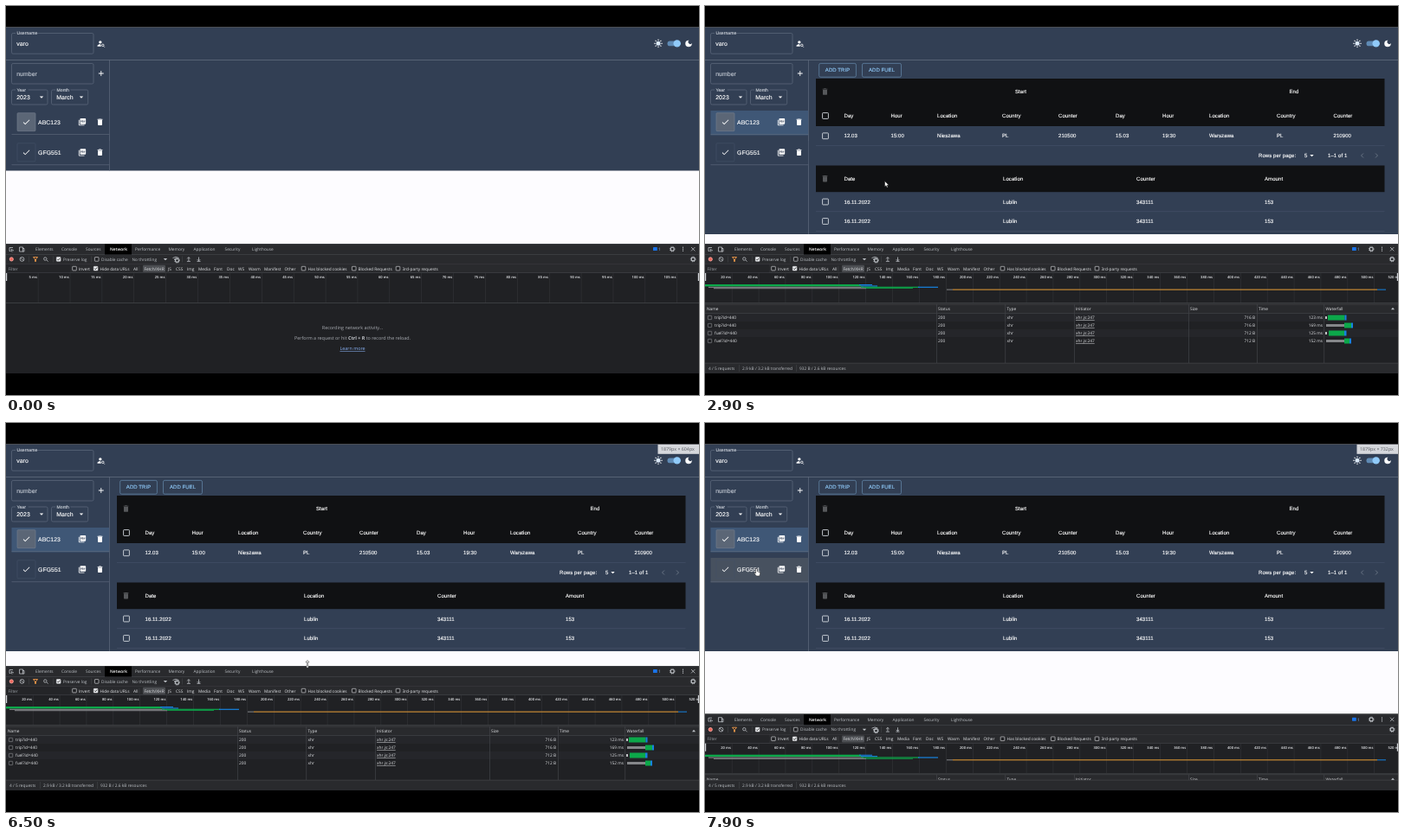
An HTML page that plays this animation: 800x450 px, repeating every 8 s.

```html
<!DOCTYPE html>
<html lang="en">
<head>
<meta charset="utf-8">
<title>Trip log with network panel</title>
<style>
  html, body { margin: 0; width: 100%; height: 100%; overflow: hidden; background: #000; }
  svg { display: block; width: 800px; height: 450px; }
  text { text-rendering: geometricPrecision; white-space: pre; }
  .app text { font-family: "Liberation Sans", Arial, sans-serif; letter-spacing: .01em; stroke-width: .14px; }
  .dev text { font-family: "Open Sans", "Noto Sans", sans-serif; }
</style>
</head>
<body>
<svg id="stage" viewBox="0 0 800 450"></svg>
<script>
const LOOP = 8000;
const $ = id => document.getElementById(id);

// ---- drawing helpers (y of text is its middle) ----
const text = (x, y, s, size, fill = '#fff', extra = '') =>
  `<text x="${x}" y="${y + size * .36}" font-size="${size}" fill="${fill}" ${extra}>${s}</text>`;
const rect = (x, y, w, h, fill, extra = '') =>
  `<rect x="${x}" y="${y}" width="${w}" height="${h}" fill="${fill}" ${extra}/>`;
const frame = (x, y, w, h, stroke, r = 1.6, sw = .7) =>
  rect(x, y, w, h, 'none', `rx="${r}" stroke="${stroke}" stroke-width="${sw}"`);
const path = (d, fill, stroke = 'none', sw = .8, extra = '') =>
  `<path d="${d}" fill="${fill}" stroke="${stroke}" stroke-width="${sw}" ${extra}/>`;
const icon = (x, y, size, body) =>
  `<g transform="translate(${x - size / 2} ${y - size / 2}) scale(${size / 24})">${body}</g>`;
const group = (id, body, extra = '') => `<g id="${id}" ${extra}>${body}</g>`;
const END = 'text-anchor="end"', MID = 'text-anchor="middle"', BOLD = 'font-weight="600"';

// ---- app ----
const NAVY = '#323f54', LINE = '#5f6b7e', WHITE = '#fff';
const app = (x, y, s, size = 6.05, fill = WHITE, extra = '') =>
  text(x, y, s, size, fill, `stroke="${fill}" ${extra}`);
const trash = (x, y, fill = WHITE) => icon(x, y, 10,
  path('M6 19a2 2 0 0 0 2 2h8a2 2 0 0 0 2-2V7H6zM19 4h-3.5l-1-1h-5l-1 1H5v2h14z', fill));
const pages = (x, y) => icon(x, y, 10,
  path('M8 2h12a2 2 0 0 1 2 2v12a2 2 0 0 1-2 2H8a2 2 0 0 1-2-2V4a2 2 0 0 1 2-2zM4 6H2v14a2 2 0 0 0 2 2h14v-2H4z', WHITE) +
  path('M9 8v5M9 8.5h2v2H9M13 8v4.5h2v-4zM18 13V8.5h2M18 10.5h2', 'none', NAVY, 1.2));
const caret = (x, y, fill = WHITE) => path(`M${x - 2.2} ${y - 1}h4.4l-2.2 2.3z`, fill);
const box = (x, y) => frame(x - 3.4, y - 3.4, 6.8, 6.8, '#d3d8df', .7, .9);

function field(x, y, w, h, label, value) {
  const gap = label ? rect(x + 4.5, y - 1, label.length * 2.65 + 4, 2, NAVY) + app(x + 6, y - .1, label, 5.1, '#ccd2da') : '';
  return frame(x, y, w, h, LINE) + gap +
    app(x + 5.7, y + h / 2 + (h < 20 ? .3 : 0), value, 6.9, label ? WHITE : '#c0c7d1');
}

function vehicle(y, name, active) {
  return rect(13, y - 10.5, 21, 21, active ? '#5b6676' : 'none', `rx="1" stroke="${active ? '#778191' : '#465268'}" stroke-width=".6"`) +
    icon(23.5, y, 10.5, path('M9 16.2 4.8 12l-1.4 1.4L9 19 21 7l-1.4-1.4z', WHITE)) +
    app(37, y, name, 6.85) + pages(88, y) + trash(108.5, y) +
    rect(6.5, y + 14.2, 113, .6, LINE);
}

function sun(x, y) {
  let rays = '';
  for (let a = 0; a < 360; a += 45) rays += `<path d="M${x} ${y - 3.3}v-1.5" stroke="#fff" stroke-width="1" transform="rotate(${a} ${x} ${y})"/>`;
  return `<circle cx="${x}" cy="${y}" r="2.5" fill="#dceafa"/>` + rays;
}

const shell =
  rect(0, 62, 800, .8, LINE) +
  field(6.5, 31.5, 94.5, 23.7, 'Username', 'varo') +
  field(6.5, 66.5, 94.5, 23.5, '', 'number') +
  field(6.5, 97, 41.5, 17, 'Year', '2023') + caret(41, 105.5) +
  field(52.5, 97, 42.2, 17, 'Month', 'March') + caret(87, 105.5) +
  icon(109.7, 43.5, 10, `<circle cx="10" cy="8" r="4" fill="#fff"/>` +
    path('M2 20v-2c0-2.600 4.500-4 8-4 1.200 0 1 3 2.500 6z', WHITE) +
    path('M19.300 19.300 22 22M20 16.500a3 3 0 1 1-6 0a3 3 0 1 1 6 0', 'none', WHITE, 2)) +
  icon(109.8, 78, 10, path('M19 13h-6v6h-2v-6H5v-2h6V5h2v6h6z', WHITE)) +
  sun(753, 43.3) + rect(763.5, 40.5, 15, 5.8, '#5f8ab4', 'rx="2.9"') +
  '<circle cx="774.700" cy="43.400" r="4.200" fill="#90caf9"/>' +
  icon(788, 43.5, 10, path('M12 3a9 9 0 1 0 9 9c0-.5 0-.9-.1-1.4A5.4 5.4 0 1 1 13.4 3.1 9 9 0 0 0 12 3z', WHITE));

const button = (x, w, s) => frame(x, 66.4, w, 15.8, '#668cae', 1.7) +
  app(x + w / 2, 74.2, s, 6, '#90caf9', `${MID} letter-spacing=".17"`);
const TRIP_X = [160.5, 214.5, 268, 343, 408, 474, 528, 582, 660, 725.5];
const FUEL_X = [160.5, 344, 498, 646];
const cells = (xs, y, words) => words.map((w, i) => app(xs[i], y, w)).join('');
const leg = ['Day', 'Hour', 'Location', 'Country', 'Counter'];
const fuelHead = ['Date', 'Location', 'Counter', 'Amount'];
const fuelRow = y => box(139, y) + cells(FUEL_X, y, ['16.11.2022', 'Lublin', '343111', '153']) +
  rect(128, y + 11, 656.5, .6, '#46536a');

const tables =
  button(131.7, 42.7, 'ADD TRIP') + button(181.5, 45, 'ADD FUEL') +
  rect(128, 84, 656.5, 55, '#101113') + trash(138.5, 99, '#56585b') + box(139, 127) +
  box(139, 150.3) + cells(TRIP_X, 150.3, ['12.03', '15:00', 'Nieszawa', 'PL', '210500', '15.03', '19:30', 'Warszawa', 'PL', '210900']) +
  rect(128, 161.3, 656.5, .6, '#46536a') +
  app(639, 172.9, 'Rows per page:') + app(692, 172.9, '5') + caret(700.5, 173) + app(719, 172.9, '1–1 of 1') +
  path('M760 170.500l-2.500 2.500 2.500 2.500M774 170.500l2.500 2.500-2.500 2.500', 'none', '#6d7888', .9) +
  rect(128, 184.5, 656.5, 30.7, '#101113') + trash(138.5, 199.7, '#56585b');

const heads =
  app(364.5, 99, 'Start', 6.05, WHITE, MID) + app(680, 99, 'End', 6.05, WHITE, MID) +
  cells(TRIP_X, 127, [...leg, ...leg]) +
  group('fuelWait', [247, 361.5, 513, 658.5].map((x, i) => app(x, 199.7, fuelHead[i], 6.05, WHITE, MID)).join('')) +
  group('fuelHead', cells(FUEL_X, 199.7, fuelHead));

// ---- network panel ----
const PANEL = '#202124', BAR = '#292a2d', EDGE = '#47494d', GREY = '#bdc1c6';
const dev = (x, y, s, fill = '#d0d3d8', extra = '', size = 4.8) => text(x, y, s, size, fill, extra);
const words = (y, list, fill) => list.map(([x, s]) => dev(x, y, s, fill)).join('');
const tick = (x, y, on) => rect(x - 2.3, y - 2.3, 4.6, 4.6, on ? '#e8eaed' : '#202124', 'rx=".5" stroke="#e8eaed" stroke-width=".6"') +
  (on ? path(`M${x - 1.4} ${y}l1.1 1.200 1.900-2.400`, 'none', '#222', .8) : '');
const gear = (x, y) => `<circle cx="${x}" cy="${y}" r="2" fill="none" stroke="${GREY}" stroke-width="1.100"/>` +
  `<circle cx="${x}" cy="${y}" r="2.900" fill="none" stroke="${GREY}" stroke-width=".8" stroke-dasharray="1.140 1.140"/>`;
const line = (d, color = GREY, sw = .8) => path(d, 'none', color, sw);

const toolbars =
  rect(0, 275, 800, 70, PANEL) + rect(0, 275, 800, 33.5, BAR) +
  rect(0, 275, 800, .6, EDGE) + rect(0, 287.3, 800, .6, EDGE) + rect(0, 298.4, 800, .5, '#3c3d41') + rect(0, 308.4, 800, .6, EDGE) +
  line('M8 279.500h-4v4h1.500M6 281.500l3 1.500M6 281.500l1 3M15.500 279h4v5h-4zM19 280.500h2v3.500h-2') +
  rect(114, 275.5, 31, 12, '#000') + dev(120, 281.4, 'Network', WHITE, BOLD) +
  words(281.4, [[34, 'Elements'], [64, 'Console'], [92, 'Sources'], [149, 'Performance'], [187.5, 'Memory'], [216.5, 'Application'], [252.5, 'Security'], [284, 'Lighthouse']], GREY) +
  rect(747, 279, 4.8, 4, '#1a73e8', 'rx=".6"') + dev(753, 281.2, '1', '#8ab4f8') + gear(769.2, 281.2) +
  [-2, 0, 2].map(d => `<circle cx="781.500" cy="${281.2 + d}" r=".65" fill="${GREY}"/>`).join('') +
  line('M791 279l4.400 4.400M795.400 279l-4.400 4.400') +
  '<circle cx="6.300" cy="292.900" r="2.100" fill="#ee675c" stroke="#f5a49d" stroke-width=".9"/>' +
  '<circle cx="18.500" cy="292.900" r="2.400" fill="none" stroke="#bdc1c6" stroke-width=".8"/>' +
  line('M16.900 291.200l3.300 3.300M45.500 292.500m-1.900 0a1.700 1.700 0 1 0 3.400 0a1.700 1.700 0 1 0-3.400 0M46.800 293.800l1.800 1.800') +
  path('M31.500 290.500h5l-2 2.500v2.500h-1V293z', 'none', '#f29a4a', .9) +
  rect(26.5, 289.5, .5, 7, EDGE) + rect(54, 289.5, .5, 7, EDGE) + rect(98.3, 289.5, .5, 7, EDGE) + rect(203.5, 289.5, .5, 7, EDGE) +
  tick(60.7, 292.9, true) + tick(104.7, 292.9) +
  words(293, [[66, 'Preserve log'], [110, 'Disable cache'], [145.5, 'No throttling']], GREY) + caret(184, 293, GREY) +
  line('M192.500 291.500q3.500-2.500 7 0M194 293.200q2-1.500 4 0') + gear(197.5, 294.2) +
  line('M210.900 295v-4.200M209.200 292.300l1.700-1.700 1.700 1.700M208.900 295.400h4M222.500 290.500v4.200M220.800 293.200l1.700 1.700 1.700-1.700M220.500 295.400h4') +
  gear(793.2, 292.9) +
  rect(0, 299.2, 74, 9, '#242528') + dev(2.5, 303.8, 'Filter', '#9aa0a6') +
  rect(158, 299.8, 26, 8, '#4d4f53', 'rx="1"') +
  tick(79, 303.6) + tick(103.6, 303.6, true) + tick(343.5, 303.6) + tick(401.7, 303.6) + tick(452.5, 303.6) +
  words(303.8, [[84, 'Invert'], [108.5, 'Hide data URLs'], [147, 'All'], [159.5, 'Fetch/XHR'], [187, 'JS'], [196, 'CSS'], [209, 'Img'], [222, 'Media'], [240, 'Font'], [255, 'Doc'], [268, 'WS'], [280, 'Wasm'], [298, 'Manifest'], [321.5, 'Other'], [348.5, 'Has blocked cookies'], [406.5, 'Blocked Requests'], [457.5, '3rd-party requests']], '#e3e5e8') +
  rect(153.7, 300.5, .5, 6.5, EDGE);

function axis(step, ms) {
  let out = '';
  for (let i = 1; i * step < 805; i++) {
    out += rect(i * step, 309, .5, 34.5, '#37393d') +
      dev(Math.min(i * step - 1, 803), 313.8, `${i * ms} ms`, '#e8eaed', `${END} ${BOLD}`, 4.1);
  }
  return out + rect(0, 309, 1.2, 9, '#d0d3d8') + rect(798.8, 309, 1.2, 9, '#d0d3d8') + rect(0, 343.3, 800, .7, EDGE);
}

const GREEN = '#0ca84a', BLUE = '#1683e0', STALL = '#85878a', ORANGE = '#c88a34';
const bars = list => list.map(([x, end, y, h, c]) => rect(x, y, end - x, h, c)).join('');
const earlyBars = bars([[0, 350, 322, 1, STALL], [10, 350, 323, 2.2, GREEN], [350, 377, 321.8, 1, BLUE], [350, 392, 323.4, 1.6, BLUE],
  [8, 352, 325.4, 1, STALL], [340, 473, 325.4, 1.1, GREEN], [473, 526, 324.6, 1, BLUE], [385, 470, 326.8, .8, GREEN], [470, 481, 326.7, 1, BLUE]]);
const lateBars = bars([[0, 180, 322, 2.4, GREEN], [178, 193, 322, 1, BLUE], [180, 199, 323.4, 1.2, BLUE], [4, 183, 324.8, 1.1, STALL],
  [180, 247, 324.7, 1.2, GREEN], [246, 269, 324.7, 1.2, BLUE], [10, 186, 326.2, 1, STALL], [186, 240, 326.2, .8, GREEN],
  [279, 286, 327.6, 1, STALL], [286, 776, 327.5, 1.2, ORANGE], [776, 786, 327.6, 1, BLUE]]);

const COLS = [267, 346.5, 426, 558, 637, 714.5];
const rules = (y, h) => COLS.map(x => rect(x, y, .6, h, EDGE)).join('');
const requests = [['trip', 716, 123], ['trip', 716, 169], ['fuel', 712, 125], ['fuel', 712, 152]];
const rowY = i => 360.5 + 9 * i;
const rowList = requests.map(([name, size, time], i) => {
  const y = rowY(i);
  return rect(0, y - 4.5, 800, 9, i % 2 ? '#202124' : '#25262a') + frame(3.4, y - 2.2, 4.3, 4.3, '#8b8e93', .4, .6) +
    words(y, [[11, `${name}?id=440`], [269, '200'], [348.5, 'xhr']], '#e3e5e8') +
    dev(428, y, 'xhr.js:247', '#e3e5e8', 'text-decoration="underline"') +
    dev(635, y, `${size} B`, '#e3e5e8', END) + dev(713, y, `${time} ms`, '#e3e5e8', END);
}).join('');
// each entry: start, green start, blue start, end
const waterfall = list => list.map(([a, g, b, e], i) => {
  const y = rowY(i);
  return (g - a > 8 ? rect(a, y - 1.5, g - a, 3, STALL) : rect(a, y - 1.5, 1.6, 3, '#e8eaed')) +
    rect(g, y - 3, b - g, 6, GREEN) + rect(b, y - 3, e - b, 6, BLUE);
}).join('');

const tableHead = rect(0, 344, 800, 11.5, BAR) + rect(0, 344.8, 800, .6, EDGE) + rect(0, 355, 800, .6, EDGE) + rules(345, 10) +
  words(350.3, [[2, 'Name'], [269, 'Status'], [348.5, 'Type'], [428, 'Initiator'], [560, 'Size'], [639, 'Time'], [716.5, 'Waterfall']], '#e3e5e8') +
  path('M792 351.300h4l-2-2.600z', GREY);
const status = rect(0, 413, 800, 12, BAR) + rect(0, 412.8, 800, .6, EDGE) + dev(4, 419.2, '4 / 5 requests', GREY) +
  rect(39, 415, .5, 8, EDGE) + rect(105, 415, .5, 8, EDGE);
const totals = (sent, size) => dev(43, 419.2, `2.9 kB / ${sent} transferred`, GREY) + dev(109, 419.2, `932 B / ${size} resources`, GREY);
const empty = dev(400, 372.3, 'Recording network activity...', '#a9adb3', MID, 5.4) +
  dev(400, 384.2, 'Perform a request or hit <tspan font-weight="700" fill="#c9ccd1">Ctrl + R</tspan> to record the reload.', '#a9adb3', MID, 5.4) +
  dev(400, 396.2, 'Learn more', '#8ab4f8', `${MID} text-decoration="underline"`, 5.4);

// ---- pointer shapes, hot spot at 0,0 ----
const pointers =
  group('ripple', '<circle r="6.800" fill="#aab2bd" opacity=".35"/>') +
  group('arrow', path('M0 0v6.500l1.500-1.300 1.100 2.400 1.100-.5-1.100-2.300h2.100z', WHITE, '#111', .5)) +
  group('hand', path('M-.9 .8a.9 .9 0 0 1 1.800 0v2.500l2.400.6q1 .3.9 1.300l-.4 2q-.2 1.200-1.200 1.200h-2.200q-.8 0-1.200-.7l-1.900-2.600q.6-.9 1.800.2z', WHITE, '#111', .45)) +
  group('resize', path('M0-4.600l2 2.300H.6v4.600H2l-2 2.300-2-2.300h1.400v-4.600H-2z', WHITE, '#111', .45));

$('stage').innerHTML =
  rect(0, 24, 800, 402, '#fdfcff') +
  group('page', rect(0, 24.5, 800, 166, NAVY, 'id="sheet"') + rect(119.2, 62, .7, 128, LINE, 'id="divider"') +
    rect(6.5, 121, 112.7, 28.5, NAVY, 'id="row1"') + rect(6.5, 156, 112.7, 28.5, NAVY, 'id="row2"') +
    shell + vehicle(134.2, 'ABC123', true) + vehicle(169.3, 'GFG551', false) +
    group('tables', tables) + group('fuelRows', fuelRow(226.5) + fuelRow(249)) +
    rect(0, 24.5, 800, 251, '#000', 'id="shade"') + group('heads', heads), 'class="app"') +
  group('tip', rect(752.5, 24.5, 47.5, 11.3, '#d5d7dc') + dev(756, 30.4, '', '#55585e', 'id="tipText"', 5.3), 'class="dev"') +
  group('panel',
    rect(0, 275, 800, 150, PANEL, 'id="panelBg"') +
    group('rows', rowList + rules(355, 58) +
      group('fallEarly', waterfall([[716.8, 720, 772, 777], [719, 773, 797, 799], [716.8, 722, 772, 779], [719, 773, 788, 793]])) +
      group('fallLate', waterfall([[716.2, 719, 738.5, 740.5], [717, 738, 746, 748], [716.2, 720, 738, 740.5], [717, 738, 744, 746]]))) +
    group('scroll', rect(793, 388, 7, 25, '#3a3b3e') + rect(794, 399, 5, 9, '#77797d') +
      path('M794.500 394h4l-2-2.500zM794.500 409h4l-2 2.500z', GREY)) +
    group('chrome', toolbars + group('axis0', axis(36.88, 5)) + group('axis1', axis(37.85, 10) + earlyBars) +
      group('axis2', axis(30.9, 20) + lateBars) + group('head', tableHead)) +
    group('empty', empty) +
    group('status', status + group('sum1', totals('2.9 kB', '932 B')) + group('sum2', totals('3.2 kB', '2.6 kB'))), 'class="dev"') +
  rect(0, 0, 800, 24.5, '#000') + rect(0, 425, 800, 25, '#000') +
  group('tipTop', '') + group('pointer', pointers);

// ---- motion ----
const moves = [[1400, 250, 268], [1900, 58, 129], [2000, 57.5, 128], [2100, 60, 136], [2300, 95.5, 222.5], [2500, 148, 228],
  [2900, 207.5, 202.5], [4700, 207.5, 202.5], [5000, 120, 190], [5300, 38.5, 170], [5500, 38.5, 170], [5900, 170, 218],
  [6400, 348, 276], [6500, 348, 279], [6800, 348, 323], [7000, 348, 334], [7300, 348, 338], [7600, 210, 262], [7900, 59.5, 168.5]];
const drag = [[6400, 0], [6600, 12], [6800, 33.5], [7000, 49], [7300, 61.7]];
const dim = [[2100, 0], [2200, .4], [2300, .35], [2500, .12], [2600, 0]];

function at(track, t) {
  const i = track.findIndex(k => k[0] > t);
  if (i < 0) return track[track.length - 1].slice(1);
  if (i === 0) return track[0].slice(1);
  const a = track[i - 1], b = track[i], p = (t - a[0]) / (b[0] - a[0]);
  return a.slice(1).map((v, k) => v + (b[k + 1] - v) * p);
}
const show = (id, on) => $(id).style.display = on ? '' : 'none';
const set = (id, name, v) => $(id).setAttribute(name, v);

function render(t) {
  t = Math.floor(t / 100) * 100;
  const [x, y] = at(moves, t), [shift] = at(drag, t);
  const loaded = t >= 2200, full = t >= 2400, late = t >= 2500;
  const bottom = full ? 264 : loaded ? 218.8 : 190.5;
  const over = top => t >= 1400 && x > 6 && x < 119 && y > top && y < top + 29;
  const on1 = over(121), on2 = over(156);

  set('sheet', 'height', bottom - 24.5);
  set('divider', 'height', bottom - 62);
  set('row1', 'fill', t >= 2100 ? '#3f5776' : on1 ? '#47515f' : NAVY);
  set('row2', 'fill', on2 ? '#47515f' : NAVY);
  show('tables', loaded); show('heads', loaded); show('fuelRows', full);
  show('fuelWait', !full); show('fuelHead', full);
  set('shade', 'opacity', at(dim, t)[0]);

  show('axis0', !loaded); show('axis1', loaded && !late); show('axis2', late);
  show('fallEarly', !late); show('fallLate', late);
  show('sum1', !late); show('sum2', late);
  show('empty', !loaded);
  for (const id of ['rows', 'head', 'status']) show(id, loaded);
  show('scroll', shift > 21);
  set('panelBg', 'y', 275 + shift);
  set('chrome', 'transform', `translate(0 ${shift})`);
  set('rows', 'transform', `translate(0 ${Math.min(shift, 21)})`);
  show('tip', t >= 6500);
  $('tipText').textContent = `1879px × ${Math.round(667 + (shift - 33.5) * 2.305)}px`;

  const sizing = t >= 6400 && t <= 7300, hand = on1 || on2;
  show('pointer', t >= 1400);
  set('pointer', 'transform', `translate(${x} ${y})`);
  show('resize', sizing); show('hand', hand); show('arrow', !sizing && !hand);
  show('ripple', t === 2000);
}

function tickFrame(now) {
  render(now % LOOP);
  requestAnimationFrame(tickFrame);
}
render(0);
requestAnimationFrame(tickFrame);
</script>
</body>
</html>
```
